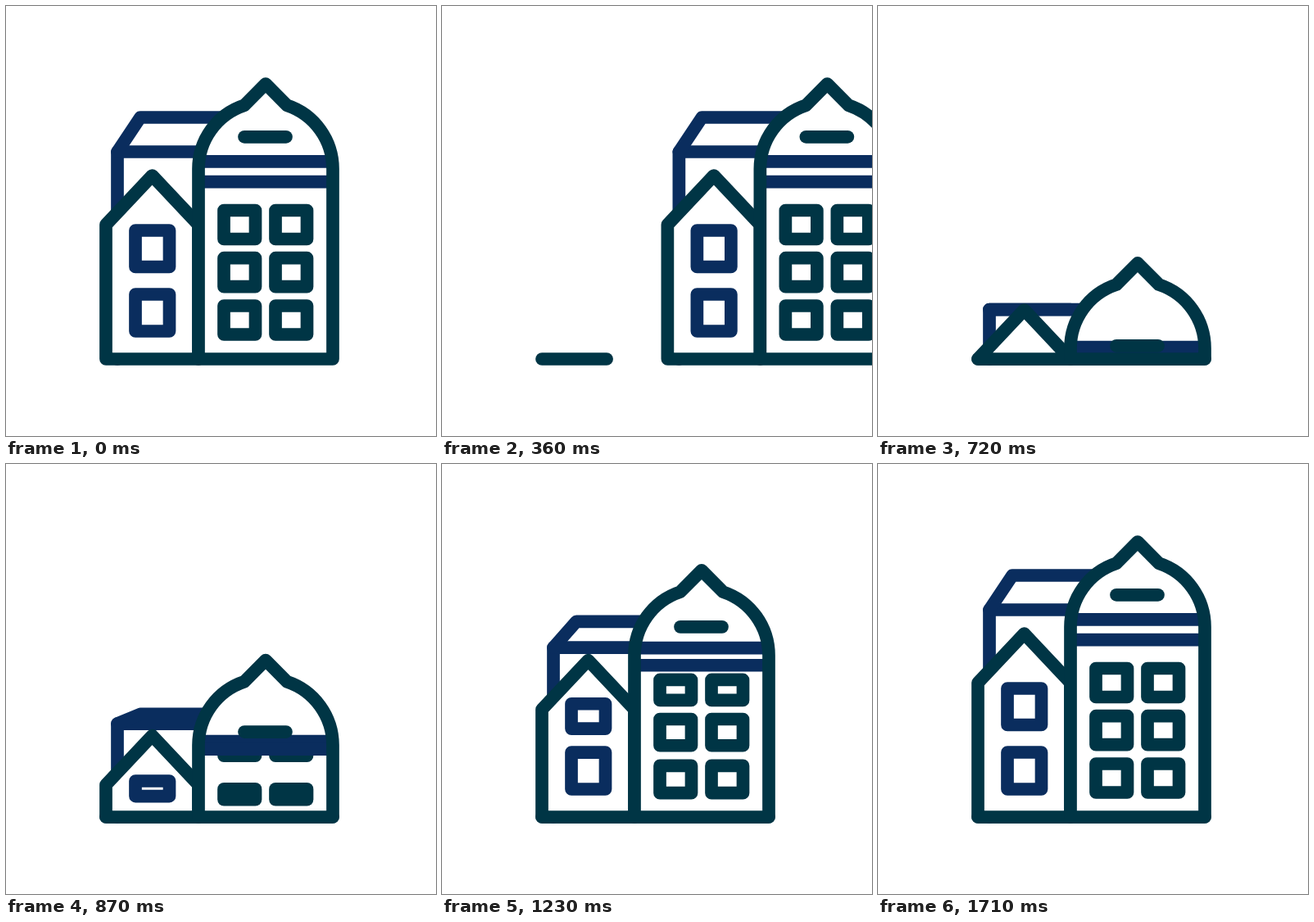
An HTML page with a canvas for the animation above (1.74 s loop, 525x525 px).

```html
<!DOCTYPE html>
<html lang="en">
<head>
<meta charset="utf-8">
<title>Town houses</title>
<style>
  html, body { margin: 0; width: 100%; height: 100%; overflow: hidden; background: #fff; }
  canvas { display: block; width: 100vw; height: 100vh; }
</style>
</head>
<body>
<canvas id="stage" width="525" height="525"></canvas>
<script>
const ctx = document.getElementById('stage').getContext('2d');
const LOOP = 1740, GROUND = 431, LINE = 15.7;
const GREEN = '#003545', BLUE = '#0a2d5e';

const clamp = v => Math.min(1, Math.max(0, v));
// Share still to travel: 1 before start, 0 after end
const left = (t, start, end, p) => Math.pow(clamp((end - t) / (end - start)), p);
const grow = (t, start, end, p) => Math.pow(clamp((t - start) / (end - start)), p);
// Lower a height towards the ground
const sink = (y, share) => y + (GROUND - y) * share;

function trace(points) {
  ctx.beginPath();
  points.forEach(([x, y]) => ctx.lineTo(x, y));
}

function stroke(color, points) {
  if (points) trace(points);
  ctx.strokeStyle = color;
  ctx.stroke();
}

function fillWhite() {
  ctx.fillStyle = '#fff';
  ctx.fill();
}

// A window unfolds from a thin bar; its top travels further than its bottom
function pane(color, x, y, w, h, drop, share) {
  const top = y + (h + drop) * share;
  const bottom = y + h + drop * share;
  ctx.beginPath();
  ctx.rect(x, top, w, bottom - top);
  stroke(color);
}

function rear(t) {
  if (t < 575) return;
  const front = sink(178, left(t, 575, 1720, 2));
  const top = front - 42 * (1 - left(t, 720, 1726, 2));
  stroke(BLUE, [[136, GROUND], [136, front], [235, front]]);
  stroke(BLUE, [[136, front], [164, top], [290, top]]);
}

function house(t) {
  const eave = sink(267, left(t, 770, 1740, 2.5));
  const peak = eave - 60 * grow(t, 490, 720, 1.4);
  const shape = () => {
    trace([[122, GROUND], [122, eave], [178.5, peak], [235, eave], [235, GROUND]]);
    ctx.closePath();
  };
  shape();
  fillWhite();
  if (t > 790) pane(BLUE, 158, 352, 41.5, 45, 14.5, left(t, 790, 1290, 3));
  if (t > 1010) pane(BLUE, 158, 274, 41.5, 44.5, 14.5, left(t, 1010, 1517, 2));
  shape();
  stroke(GREEN);
}

function tower(t) {
  const base = sink(199, left(t, 698, 1701, 2.5));
  const s = grow(t, 435, 700, 1.4);
  const inner = left(t, 697, 1687, 2.5);
  // The dome's curves bend more as it swells
  const side = base - 35.3 * s, notch = base - 77.8 * s;
  const handleX = 33.6 * s, handleY = notch + 11.2 * s;
  const shape = () => {
    ctx.beginPath();
    ctx.moveTo(235, GROUND);
    ctx.lineTo(235, base);
    ctx.bezierCurveTo(235, side, 291 - handleX, handleY, 291, notch);
    ctx.lineTo(317, base - 104 * s);
    ctx.lineTo(343, notch);
    ctx.bezierCurveTo(343 + handleX, handleY, 399, side, 399, base);
    ctx.lineTo(399, GROUND);
    ctx.closePath();
  };
  shape();
  fillWhite();

  const rows = [[249.5, 1000, 1498], [307.7, 871, 1371], [366, 745, 1370]];
  for (const [y, start, end] of rows) {
    if (t < start) continue;
    const share = left(t, start, end, 2);
    for (const x of [266, 329]) pane(GREEN, x, y, 38.5, 35, 13.5, share);
  }
  for (const y of [189.9, 214.6]) {
    const band = sink(y, inner);
    stroke(BLUE, [[237, band], [397, band]]);
  }
  const sign = sink(159.8, inner);
  stroke(GREEN, [[291, sign], [342, sign]]);
  shape();
  stroke(GREEN);
}

function town(t) {
  rear(t);
  house(t);
  tower(t);
}

function draw(t) {
  ctx.fillStyle = '#fff';
  ctx.fillRect(0, 0, 525, 525);
  ctx.lineWidth = LINE;
  ctx.lineCap = ctx.lineJoin = 'round';

  // The new ground line, then the new town
  if (t > 300) {
    const end = 122 + 277 * grow(t, 300, 460, 1.3);
    stroke(GREEN, [[122, GROUND], [end, GROUND]]);
  }
  if (t > 460) town(t);

  // The finished town speeds off to the right
  const shift = Math.pow(Math.max(0, t - 32.5) * 0.0377, 2);
  if (shift < 420) {
    ctx.save();
    ctx.translate(shift, 0);
    town(LOOP);
    ctx.restore();
  }
}

const begin = performance.now();
function tick() {
  draw((performance.now() - begin) % LOOP);
  requestAnimationFrame(tick);
}
tick();
</script>
</body>
</html>
```
